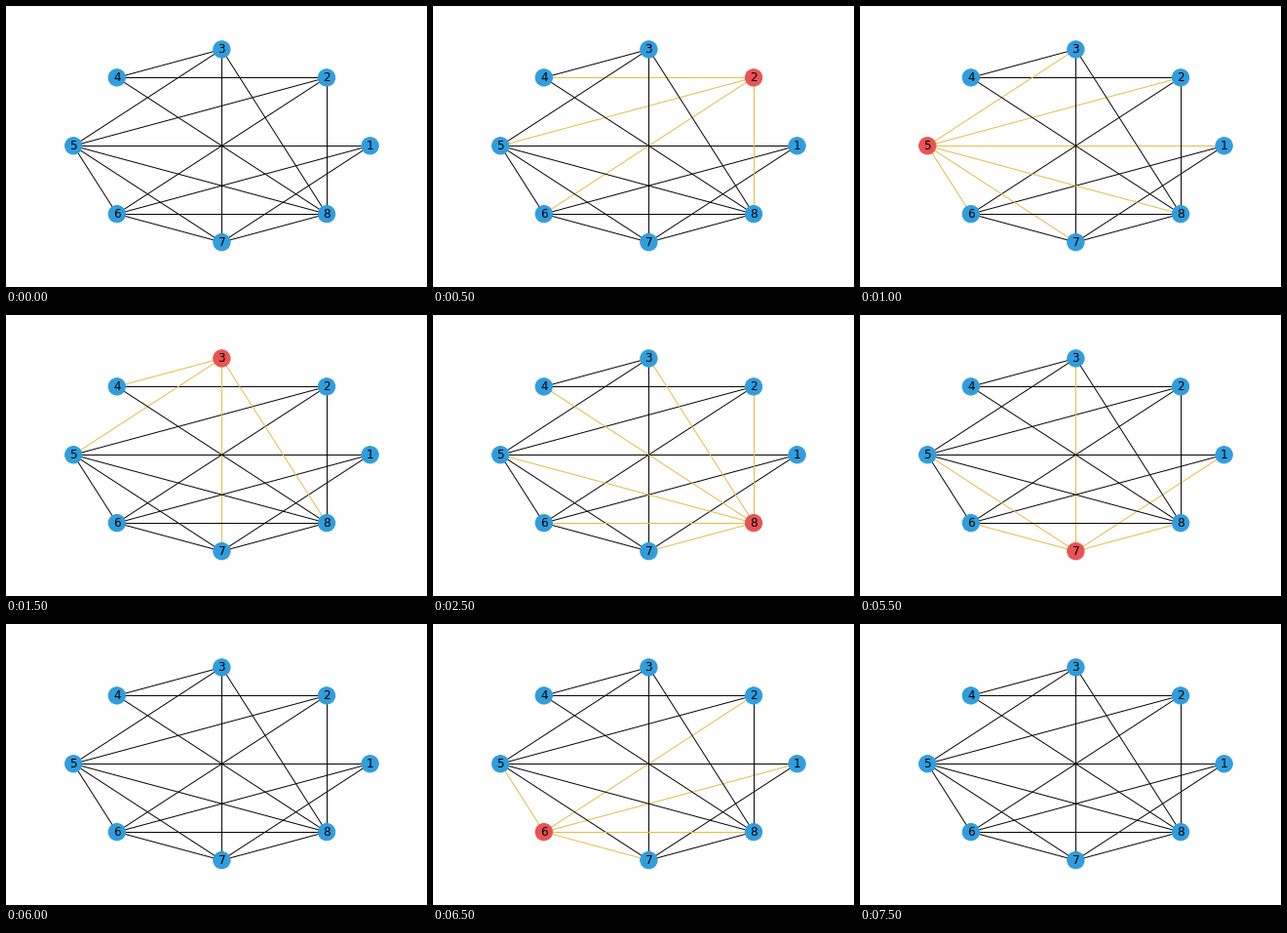
A matplotlib script that plays this animation: 432 px wide and 288 px high, repeating every 8 s.

```python
from itertools import combinations

import numpy as np
import matplotlib.pyplot as plt
from matplotlib.animation import FuncAnimation
from matplotlib.collections import LineCollection

W, H, DPI = 432, 288, 72
STEP, LOOP = 500, 8000
BLUE, RED = "#309ddd", "#ea5354"
BLACK, GOLD = "#060606", "#e4bc4c"

# The graph is complete apart from a few gaps, given as node: absent later nodes
GAPS = {1: "2348", 2: "37", 3: "6", 4: "567"}
LABELS = range(1, 9)
EDGES = [(a, b) for a, b in combinations(LABELS, 2)
         if str(b) not in GAPS.get(a, "")]

# Walk along the graph: time in ms -> node lit for one step
VISITS = {500: 2, 1000: 5, 1500: 3, 2500: 8, 5500: 7, 6500: 6, 7000: 2}

angle = np.arange(len(LABELS)) * 2 * np.pi / len(LABELS)
xy = np.column_stack([np.cos(angle), np.sin(angle)])

fig = plt.figure(figsize=(W / DPI, H / DPI), dpi=DPI, facecolor="white")
ax = fig.add_subplot()
fig.subplots_adjust(left=0.125, right=0.9, bottom=0.125, top=0.88)
ax.set_xlim(-1.1, 1.1)
ax.set_ylim(-1.1, 1.1)
ax.axis("off")

lines = LineCollection([xy[[a - 1, b - 1]] for a, b in EDGES],
                       linewidths=1, zorder=1)
ax.add_collection(lines)
nodes = ax.scatter(xy[:, 0], xy[:, 1], s=300, linewidths=1, zorder=2)
for label, (x, y) in zip(LABELS, xy):
    ax.text(x, y, str(label), fontsize=12, family="DejaVu Sans",
            ha="center", va="center", zorder=3)


def draw(frame):
    active = VISITS.get(frame * STEP)
    lines.set_color([GOLD if active in edge else BLACK for edge in EDGES])
    nodes.set_color([RED if label == active else BLUE for label in LABELS])
    return lines, nodes


anim = FuncAnimation(fig, draw, frames=LOOP // STEP, interval=STEP,
                     repeat=True, repeat_delay=0)
plt.show()
```
